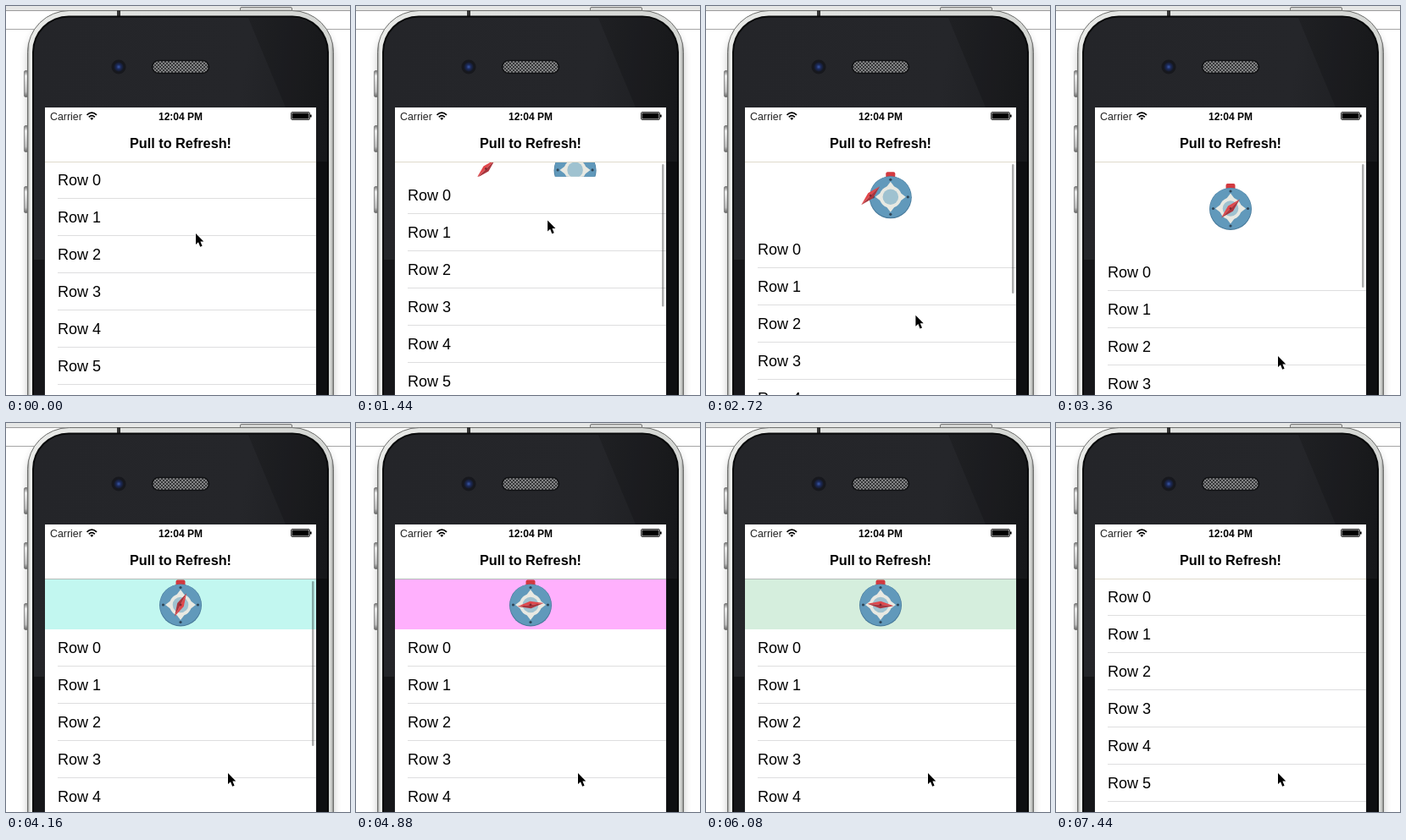
An HTML page that plays this animation: 406 px wide and 460 px high, repeating every 7520 ms.

```html
<!DOCTYPE html>
<html>
<head>
<meta charset="utf-8">
<title>Pull to Refresh</title>
<style>
html, body { margin: 0; width: 100%; height: 100%; overflow: hidden; background: #fff; }
svg { display: block; width: 406px; height: 460px; font-family: "Liberation Sans", Arial, sans-serif; }
</style>
</head>
<body>
<svg viewBox="0 0 406 460">
  <defs>
    <linearGradient id="steel" x1="0" x2="1">
      <stop offset="0" stop-color="#8c8d8b"/><stop offset=".008" stop-color="#e9eae8"/>
      <stop offset=".5" stop-color="#dcdedc"/><stop offset=".992" stop-color="#d4d6d3"/>
      <stop offset="1" stop-color="#858684"/>
    </linearGradient>
    <linearGradient id="key" x1="0" x2="0" y1="0" y2="1">
      <stop offset="0" stop-color="#777"/><stop offset=".2" stop-color="#eee"/>
      <stop offset=".8" stop-color="#bbb"/><stop offset="1" stop-color="#666"/>
    </linearGradient>
    <linearGradient id="glass" x1="0" x2="1" y1="0" y2=".25">
      <stop offset="0" stop-color="#242529"/><stop offset=".7" stop-color="#25262a"/>
      <stop offset="1" stop-color="#1b1c1f"/>
    </linearGradient>
    <radialGradient id="lens">
      <stop offset="0" stop-color="#3a58a8"/><stop offset=".45" stop-color="#1c2a5a"/>
      <stop offset="1" stop-color="#15171f"/>
    </radialGradient>
    <pattern id="mesh" width="4" height="4" patternUnits="userSpaceOnUse">
      <rect width="4" height="4" fill="#37383a"/>
      <path d="M0 0L4 4M4 0L0 4" stroke="#8b8c8d" stroke-width=".9"/>
    </pattern>
    <filter id="soft" x="-10%" width="120%"><feGaussianBlur stdDeviation="5"/></filter>
    <clipPath id="gap"><rect id="gapBox" x="46" y="184" width="320" height="0"/></clipPath>
    <clipPath id="list"><rect x="46" y="184" width="320" height="276"/></clipPath>
  </defs>

  <!-- window behind the phone -->
  <rect width="406" height="5" fill="#e6e7e6"/>
  <rect y="5" width="406" height="1" fill="#9a9a9a"/>
  <rect y="27" width="406" height="1" fill="#a6a6a6"/>

  <!-- phone -->
  <rect x="25" y="14" width="362" height="560" rx="48" fill="#000" opacity=".22" filter="url(#soft)"/>
  <rect x="276.5" y="1.5" width="61" height="8" rx="1.5" fill="#d5d6d4" stroke="#777"/>
  <g fill="url(#key)" stroke="#777" stroke-width=".8">
    <rect x="21.5" y="76.5" width="6" height="31" rx="1.5"/>
    <rect x="21.5" y="141.5" width="6" height="31" rx="1.5"/>
    <rect x="21.5" y="213.5" width="6" height="31" rx="1.5"/>
  </g>
  <rect x="25.5" y="5.5" width="361" height="580" rx="49" fill="url(#steel)" stroke="#6d6e6c"/>
  <rect x="131" y="5" width="4" height="7" fill="#333"/>
  <rect x="31" y="11.5" width="350" height="580" rx="43" fill="#08090a"/>
  <rect x="33" y="13.5" width="346" height="580" rx="41" fill="url(#glass)"/>
  <path d="M286 14H338Q379 18 379 56V460H366V120H330Z" fill="#000" opacity=".17"/>
  <path d="M367 184H381V460H367ZM32 300H45V460H32Z" fill="#000" opacity=".4"/>
  <circle cx="133" cy="72" r="8.5" fill="#17181d"/>
  <circle cx="133" cy="72" r="6" fill="url(#lens)"/>
  <rect x="172.5" y="64.5" width="67" height="15" rx="7.5" fill="url(#mesh)" stroke="#111214" stroke-width="1.6"/>

  <!-- screen -->
  <rect x="46" y="120" width="320" height="340" fill="#fff"/>
  <g clip-path="url(#gap)">
    <rect id="tint" x="46" y="184" width="320" height="160"/>
    <g id="compass">
      <rect x="-5.5" y="-28.5" width="11" height="8" rx="2" fill="#d23a40"/>
      <circle cy="1.5" r="25" fill="#47799a"/>
      <circle cy="1" r="24.3" fill="#6199bb"/>
      <path id="star" fill="#e8e9e2"/>
      <circle cy="1" r="13" fill="#e8e9e2"/>
      <circle cy="1" r="9.3" fill="#9fc2d0"/>
      <g fill="#2f4658">
        <circle cy="-19.5" r="1.6"/><circle cy="21.5" r="1.6"/>
        <circle cx="-20.5" cy="1" r="1.6"/><circle cx="20.5" cy="1" r="1.6"/>
      </g>
    </g>
    <g id="needle">
      <path d="M0-15.5L4.2 0L0 15.5Z" fill="#a9353d"/>
      <path d="M0-15.5L-4.2 0L0 15.5Z" fill="#e0474b"/>
      <circle r="1.4" fill="#7d2a31"/>
    </g>
  </g>
  <g clip-path="url(#list)"><g id="rows" font-size="18"></g></g>
  <rect id="bar" x="361" y="187" width="2.5" rx="1.2" fill="#000"/>
  <rect id="line" x="46" y="184" width="320" height="1"/>

  <!-- status and title -->
  <text x="52" y="134.5" font-size="12.4" fill="#222">Carrier</text>
  <g fill="none" stroke="#000" stroke-width="1.8">
    <path d="M95.5 128.8Q101.2 123.4 107 128.8M97.8 131.3Q101.2 128 104.8 131.3"/>
  </g>
  <path d="M99.3 132.8Q101.2 131.2 103.2 132.8L101.2 135Z"/>
  <text x="206" y="134.5" font-size="12" font-weight="bold" text-anchor="middle">12:04 PM</text>
  <rect x="336.5" y="125.5" width="22" height="9" rx="1.5" fill="none" stroke="#000" stroke-width=".8"/>
  <rect x="337.5" y="126.5" width="20" height="7" rx=".6"/>
  <rect x="359" y="128.5" width="1.6" height="3"/>
  <text x="206" y="168" font-size="16.25" font-weight="bold" text-anchor="middle">Pull to Refresh!</text>

  <path id="cursor" d="M0 0V13L3 10.3L5.2 15.7L7.6 14.7L5.4 9.5H9.3Z" stroke="#fff" stroke-width="1.4" paint-order="stroke"/>
</svg>
<script>
const LOOP = 7520, STEP = 80;
const $ = id => document.getElementById(id);
const set = (id, attrs) => { for (const k in attrs) $(id).setAttribute(k, attrs[k]); };
const smooth = u => u * u * (3 - 2 * u);
const linear = u => u;
const easeOut = u => 1 - (1 - u) ** 3;

// Value of [time, value, easing?] keys at time t
function track(keys, t) {
  if (t <= keys[0][0]) return keys[0][1];
  for (let i = 1; i < keys.length; i++) {
    const [t0, a] = keys[i - 1], [t1, b, ease = linear] = keys[i];
    if (t <= t1) return a + (b - a) * ease((t - t0) / (t1 - t0));
  }
  return keys[keys.length - 1][1];
}

const pull = [[1000, 0], [2160, 47], [3200, 109, smooth], [3440, 109],
              [3920, 60, easeOut], [6440, 60], [6880, 0, smooth]];
const mouseX = [[80, 224], [900, 224], [2160, 229], [3200, 262, smooth]];
const mouseY = [[80, 269], [900, 222, smooth], [1000, 222], [2160, 305], [3200, 414, smooth]];
const turns = [[3644, 0], [4160, 1.8], [4880, 4.42], [6080, 8.55], [6880, 11.3]];
const barEnd = [[1000, 360], [2160, 348], [3200, 333], [3440, 333], [3920, 382, easeOut]];
const barAlpha = [[1000, 0], [1160, .32], [4160, .32], [4480, 0]];

const orange = [255, 217, 179], cyan = [179, 255, 255], purple = [217, 179, 217],
      magenta = [255, 176, 253], red = [255, 179, 179], blue = [179, 179, 255];
const hues = [orange, cyan, purple, magenta, magenta, red, blue];

function tint(p) {
  const i = Math.floor(p);
  const a = i ? hues[(i - 1) % 7] : [255, 255, 255], b = hues[i % 7];
  return `rgb(${a.map((v, k) => Math.round(v + (b[k] - v) * (p - i)))})`;
}

let star = "";
for (let i = 0; i < 8; i++) {
  const a = i * Math.PI / 4, r = i % 2 ? 11 : 18;
  star += `${i ? "L" : "M"}${r * Math.sin(a)} ${1 - r * Math.cos(a)}`;
}
set("star", { d: star + "Z" });

for (let i = 0; i < 7; i++) {
  const y = 184 + 44 * i;
  $("rows").innerHTML += `<rect x="46" y="${y}" width="320" height="44" fill="#fff"/>
    <text x="61" y="${y + 28}">Row ${i}</text>
    <rect x="61" y="${y + 43}" width="305" height="1" fill="#dededf"/>`;
}

function draw(t) {
  const off = track(pull, t), p = track(turns, t);
  const joined = off >= 100 || t > 3200;
  const spread = joined ? 0 : 64 * (1 - off / 100);
  const y = 184 + off / 2;
  set("gapBox", { height: off });
  set("tint", { fill: tint(p) });
  set("compass", { transform: `translate(${206 + spread} ${y})` });
  set("needle", { transform: `translate(${206 - spread} ${y + (joined ? 1 : -.5)}) rotate(${45 + 90 * p})` });
  set("rows", { transform: `translate(0 ${Math.round(off)})` });
  set("bar", { height: track(barEnd, t) - 187, opacity: track(barAlpha, t) });
  set("line", { fill: p > 0 && off > 0 ? "#b4bdb9" : "#dfdacb" });
  set("cursor", { transform: `translate(${track(mouseX, t)} ${track(mouseY, t)})` });
}

const start = performance.now();
function tick() {
  const t = (performance.now() - start) % LOOP;
  draw(Math.floor(t / STEP) * STEP);
  requestAnimationFrame(tick);
}
tick();
</script>
</body>
</html>
```
